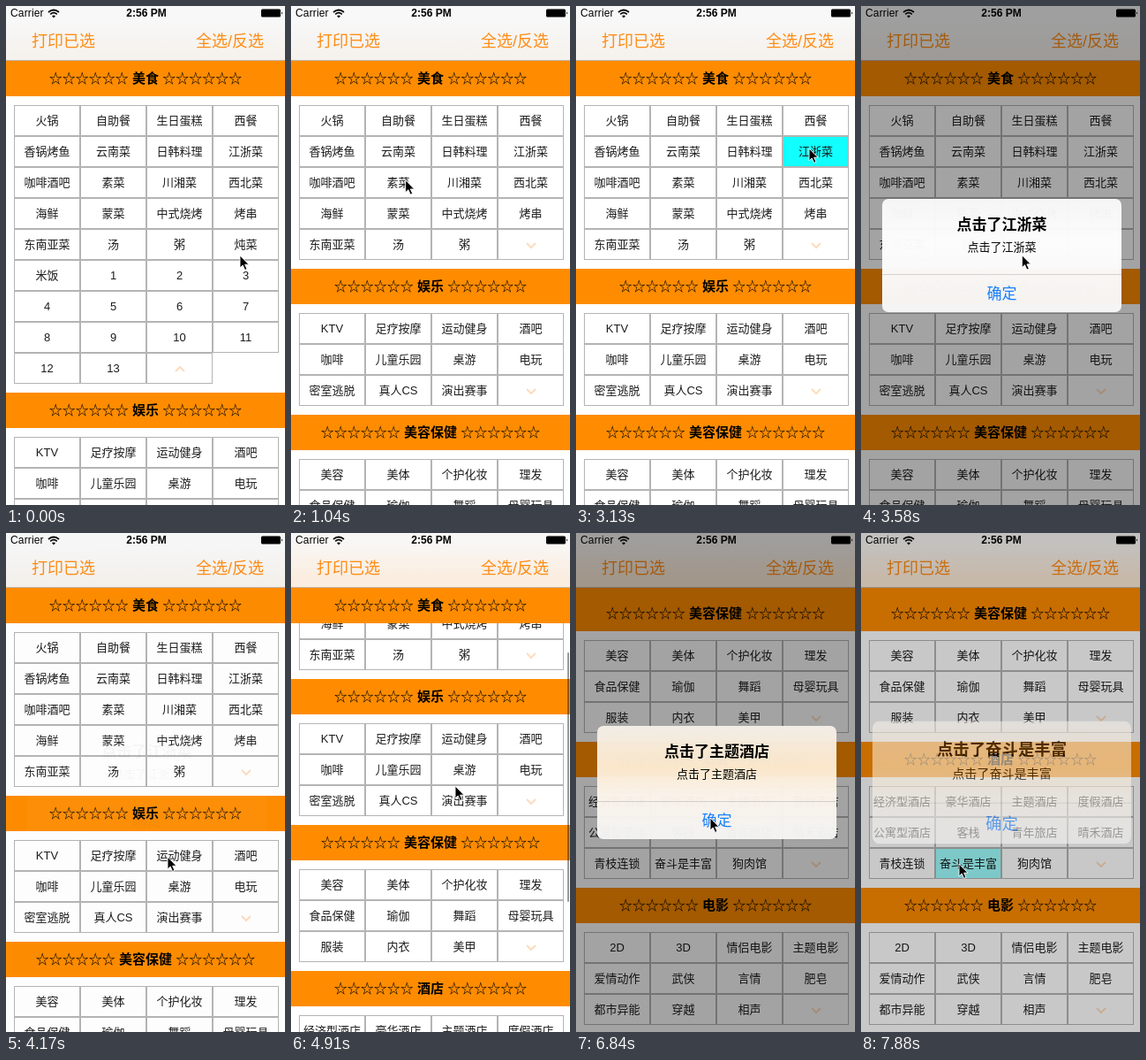
Write an HTML page that moves like this. It is 316 px wide and 564 px high and loops after 8000 ms.

```html
<!DOCTYPE html>
<html lang="zh-CN">
<head>
<meta charset="utf-8">
<title>分类列表</title>
<style>
html, body { margin: 0; width: 100%; height: 100%; overflow: hidden; background: #fff; }
body { font: 13px "Liberation Sans", "Noto Sans CJK SC", "Noto Sans CJK", sans-serif; color: #000; }
div, svg { position: absolute; box-sizing: border-box; }
#stage { left: 0; top: 0; width: 316px; height: 564px; overflow: hidden; }
.text { text-align: center; white-space: nowrap; }
.head { left: 0; width: 316px; height: 40px; line-height: 40px; font-size: 15px; background: #ff8c00; z-index: 1; }
.grid { left: 9px; width: 300px; overflow: hidden; }
.cell { width: 75px; height: 35px; line-height: 34px; border: 1px solid #b4b4b4; color: #1c1c1c; }
.cell svg { left: 31px; top: 14px; }
#end { left: 15px; width: 301px; height: 1px; background: #c8c7cc; }
#bar { left: 313px; width: 2px; border-radius: 1px; background: rgba(0,0,0,.4); z-index: 2; }
#nav { left: 0; top: 0; width: 316px; height: 62px; z-index: 3; border-bottom: 1px solid rgba(90,60,30,.35);
  background: linear-gradient(#f8f8f8 25%, #f5f1ec); }
#tint { width: 316px; height: 61px; background: linear-gradient(#f8f6f4 15%, #fdebd9 80%); }
.button { top: 27px; line-height: 26px; font-size: 18px; color: #ff8c14; white-space: nowrap; }
.status { top: 1px; line-height: 15px; font-size: 12px; }
#dim { width: 316px; height: 564px; background: #000; z-index: 4; }
#alert { left: 24px; top: 218px; width: 271px; height: 128px; border-radius: 7px; z-index: 5; }
#alert .text { left: 0; width: 271px; }
#title { top: 17px; line-height: 26px; font-size: 17px; font-weight: bold; }
#message { top: 45px; line-height: 20px; }
#ok { top: 85px; height: 43px; line-height: 43px; font-size: 17px; color: #157efb; border-top: 1px solid rgba(0,0,0,.15); }
#cursor { left: -1px; top: -1px; z-index: 6; }
</style>
</head>
<body>
<div id="stage">
  <div id="end"></div>
  <div id="bar"></div>
  <div id="nav">
    <div id="tint"></div>
    <div class="status" style="left:5px;letter-spacing:.15px">Carrier</div>
    <svg style="left:47px;top:3px" width="14" height="11" fill="none" stroke="#000" stroke-width="1.7">
      <path d="M1 4Q7 -1 13 4M3.2 6.3Q7 3 10.8 6.3"/><path d="M5 8.2Q7 6.6 9 8.2L7 10.4Z" fill="#000" stroke="none"/>
    </svg>
    <div class="status text" style="left:109px;width:100px;font-weight:bold">2:56 PM</div>
    <svg style="left:288px;top:3px" width="26" height="11">
      <rect x="1" y=".5" width="22" height="9" rx="1.5"/>
      <path d="M24 3.5q2 1.5 0 3Z"/>
    </svg>
    <div class="button" style="left:29px">打印已选</div>
    <div class="button" style="left:215px">全选/反选</div>
  </div>
  <div id="dim"></div>
  <div id="alert">
    <div id="title" class="text"></div>
    <div id="message" class="text"></div>
    <div id="ok" class="text">确定</div>
  </div>
  <svg id="cursor" width="14" height="20" viewBox="-1 -1 14 20">
    <path d="M0 0V14L3.2 11L5.6 16.4L8 15.3L5.6 10.2H10Z" stroke="#fff" stroke-width=".9"/>
  </svg>
</div>
<script>
const LOOP = 8000, STEP = 148.6, LEAD = 8;
const NAV = 62, ROW = 35, HEAD = 40, GAP = 10, END = 391;
const $ = id => document.getElementById(id);
const stage = $('stage');

const data = [
  ['美食', '火锅 自助餐 生日蛋糕 西餐 香锅烤鱼 云南菜 日韩料理 江浙菜 咖啡酒吧 素菜 川湘菜 西北菜 海鲜 蒙菜 中式烧烤 烤串 ' +
    '东南亚菜 汤 粥 炖菜 米饭 1 2 3 4 5 6 7 8 9 10 11 12 13 ^'],
  ['娱乐', 'KTV 足疗按摩 运动健身 酒吧 咖啡 儿童乐园 桌游 电玩 密室逃脱 真人CS 演出赛事 v'],
  ['美容保健', '美容 美体 个护化妆 理发 食品保健 瑜伽 舞蹈 母婴玩具 服装 内衣 美甲 v'],
  ['酒店', '经济型酒店 豪华酒店 主题酒店 度假酒店 公寓型酒店 客栈 青年旅店 晴禾酒店 青枝连锁 奋斗是丰富 狗肉馆 v'],
  ['电影', '2D 3D 情侣电影 主题电影 爱情动作 武侠 言情 肥皂 都市异能 穿越 相声 v']
];

// section, cell, press time, alert start, dismiss start
const taps = [
  [0, 5, 1480, 1550, 2320],
  [0, 7, 3050, 3125, 3960],
  [3, 2, 5900, 5990, 7080],
  [3, 9, 7750, 7785, 9000]
];

const cursorPath = [
  [0, 265, 282], [420, 194, 405], [600, 194, 405], [1185, 118, 159], [1850, 118, 159], [2200, 155, 322],
  [2330, 155, 322], [2950, 264, 161], [3250, 264, 161], [3720, 155, 322], [3960, 155, 322], [4150, 183, 366],
  [4500, 184, 385], [4900, 186, 286], [6250, 186, 286], [6830, 152, 322], [7100, 152, 322], [7570, 111, 374]
];
const scrollPath = [[4550, 0], [4900, 130], [5150, 290], [5380, 391], [5480, 400], [5620, 394], [5810, 394], [5900, END]];

const clamp = u => Math.max(0, Math.min(1, u));
const span = (t, from, length) => clamp((t - from) / length);
const smooth = u => u * u * (3 - 2 * u);
const easeOut = u => 1 - (1 - u) ** 2;

function along(path, t, ease = u => u) {
  const i = path.findIndex(p => p[0] > t);
  if (i < 0) return path[path.length - 1].slice(1);
  if (!i) return path[0].slice(1);
  const a = path[i - 1], b = path[i], u = ease((t - a[0]) / (b[0] - a[0]));
  return a.slice(1).map((v, k) => v + (b[k + 1] - v) * u);
}

function add(parent, cls, html = '') {
  const el = document.createElement('div');
  el.className = cls;
  el.innerHTML = html;
  return parent.appendChild(el);
}

function label(name) {
  const d = { v: 'M1 1L6 6L11 1', '^': 'M1 6L6 1L11 6' }[name];
  return d ? `<svg width="12" height="8"><path d="${d}" fill="none" stroke="#fddcbd" stroke-width="2"/></svg>` : name;
}

const stars = '☆'.repeat(6);
const sections = data.map(([name, list]) => {
  const names = list.split(' '), grid = add(stage, 'grid');
  const cells = names.map((n, i) => {
    const cell = add(grid, 'cell text', label(n));
    cell.style.left = i % 4 * 75 + 'px';
    cell.style.top = (i >> 2) * ROW + 'px';
    return cell;
  });
  return { names, grid, cells, head: add(stage, 'head text', `${stars} <b>${name}</b> ${stars}`) };
});

function layout(t) {
  const [offset] = along(scrollPath, t);
  const fold = smooth(span(t, 500, 300));
  sections[0].cells[19].innerHTML = label(fold > 0 ? 'v' : '炖菜');
  let y = NAV - offset;
  sections.forEach((s, i) => {
    const rows = i ? 3 : 9 - 4 * fold, next = y + HEAD + 2 * GAP + rows * ROW;
    s.head.style.top = Math.min(Math.max(NAV, y), next - HEAD) + 'px';
    s.grid.style.top = y + HEAD + GAP + 'px';
    s.grid.style.height = rows * ROW + 'px';
    y = next;
  });
  $('end').style.top = y + 'px';
  $('tint').style.opacity = clamp(offset / 200);

  const top = 65 + 207 * Math.min(1, offset / END) + Math.max(0, offset - END);
  $('bar').style.top = top + 'px';
  $('bar').style.height = Math.min(282, 561 - top) + 'px';
  $('bar').style.opacity = span(t, 4550, 100) * (1 - span(t, 5800, 130));
}

function popup(t) {
  let shown = 0, scale = 1;
  taps.forEach(([s, c, press, open, close], i) => {
    const { names, cells } = sections[s];
    const p = easeOut(span(t, open, 250));
    cells[c].style.background = t >= press ? `rgba(18,255,255,${1 - p})` : '';
    if (t < open) return;
    shown = p * (1 - easeOut(span(t, close, 240)));
    scale = 1.2 - .2 * p;
    $('title').textContent = $('message').textContent = '点击了' + names[c];
    $('alert').style.background = i > 1
      ? 'linear-gradient(rgba(244,239,232,.97), rgba(253,235,209,.97) 36%, rgba(252,245,236,.97) 62%, rgba(245,245,245,.97))'
      : 'linear-gradient(rgba(248,248,248,.97), rgba(255,255,255,.97) 40%, rgba(247,247,247,.97))';
  });
  $('alert').style.opacity = shown;
  $('alert').style.transform = `scale(${scale})`;
  $('dim').style.opacity = .36 * shown;
}

function draw(now) {
  const t = Math.floor((now % LOOP + LEAD) / STEP) * STEP;
  layout(t);
  popup(t);
  const [x, y] = along(cursorPath, t, smooth);
  $('cursor').style.transform = `translate(${x}px,${y}px)`;
  requestAnimationFrame(draw);
}
draw(0);
</script>
</body>
</html>
```
